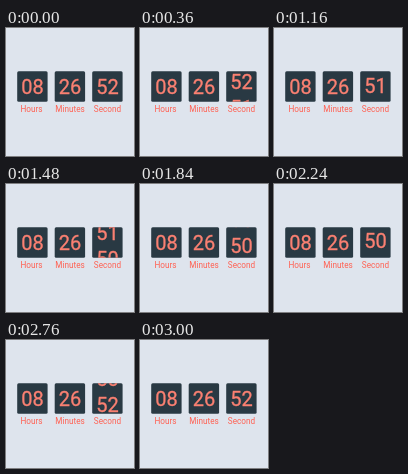
An HTML page for the animation above (3120 ms loop, 128 by 128 pixels).

```html
<!DOCTYPE html>
<html lang="en">
<head>
<meta charset="utf-8">
<style>
  html, body { margin: 0; width: 100%; height: 100%; overflow: hidden; background: #dee4ed; }
  svg { display: block; width: 128px; height: 128px; }
  text { font-family: Roboto, Arial, sans-serif; text-anchor: middle; }
  .box { fill: #293943; }
  .digits { font-size: 20px; fill: #fa8072; stroke: #fa8072; stroke-width: .3px; }
  .label { font-size: 8.2px; fill: #ff6254; }
</style>
</head>
<body>
<svg viewBox="0 0 128 128">
  <clipPath id="window"><rect x="86.2" y="43.2" width="30.4" height="30.6" rx="1.5"/></clipPath>
  <g class="box">
    <rect x="11.2" y="43.2" width="30.4" height="30.6" rx="1.5"/>
    <rect x="48.7" y="43.2" width="30.4" height="30.6" rx="1.5"/>
    <rect x="86.2" y="43.2" width="30.4" height="30.6" rx="1.5"/>
  </g>
  <g class="digits">
    <text x="26.5" y="66">08</text>
    <text x="64" y="66">26</text>
    <g clip-path="url(#window)"><g id="strip">
      <text x="101.5" y="66">52</text>
      <text x="101.5" y="92">51</text>
      <text x="101.5" y="118">50</text>
      <text x="101.5" y="144">52</text>
    </g></g>
  </g>
  <g class="label">
    <text x="25.5" y="84.2">Hours</text>
    <text x="64" y="84.2">Minutes</text>
    <text x="101.5" y="84.2">Second</text>
  </g>
</svg>
<script>
  const LOOP = 3120, STEP = 40, START = 65, ROW = 26;
  const strip = document.getElementById('strip');

  // Each second eases the strip up by one row.
  function offset(ms) {
    const t = Math.min(3, Math.max(0, (ms - START) / 1000));
    const row = Math.floor(t);
    return ROW * (row + (1 - Math.cos(Math.PI * (t - row))) / 2);
  }

  function draw() {
    const ms = Math.floor(performance.now() % LOOP / STEP) * STEP;
    strip.setAttribute('transform', `translate(0 ${-offset(ms).toFixed(2)})`);
    requestAnimationFrame(draw);
  }
  draw();
</script>
</body>
</html>
```
